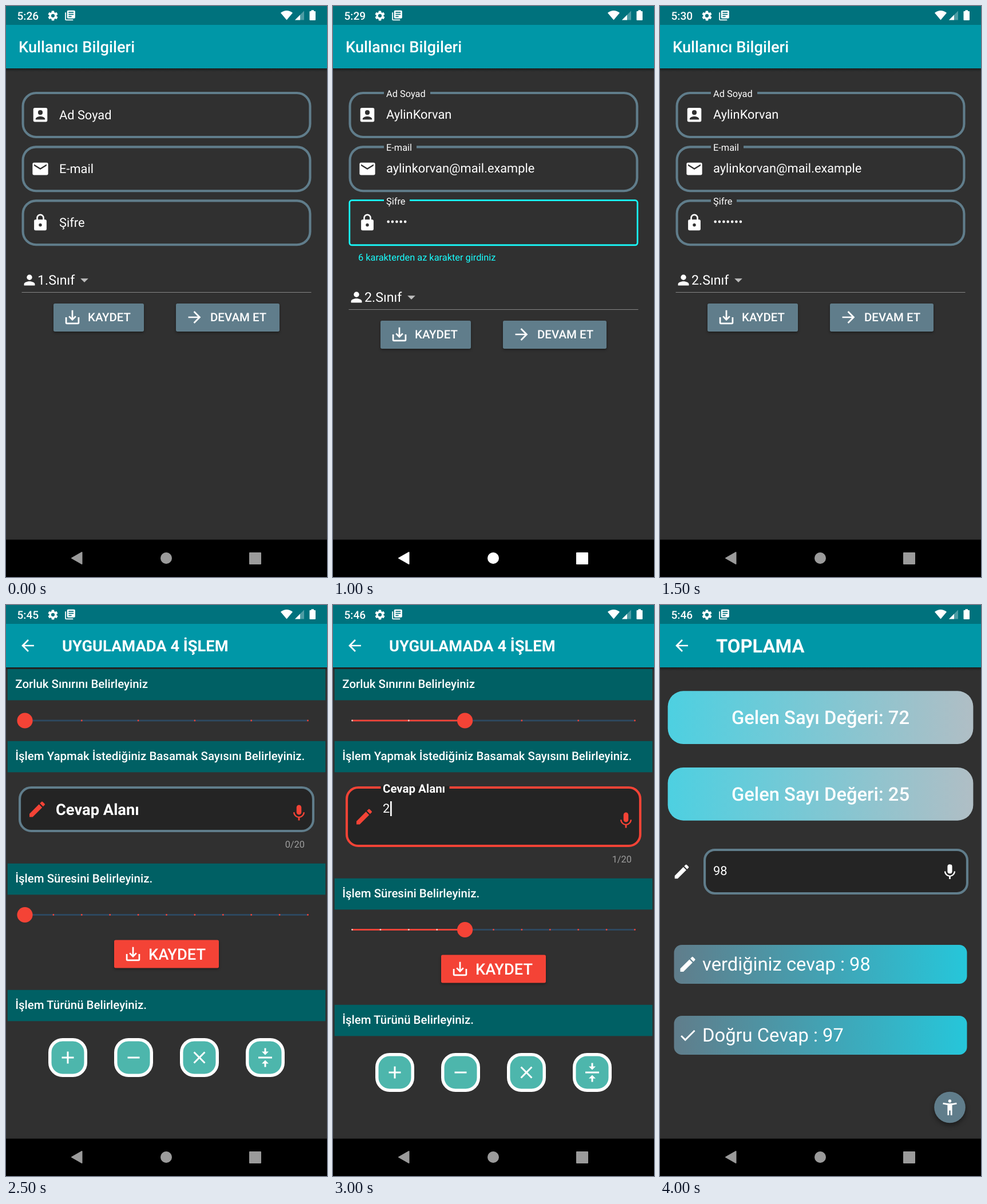
An HTML page for the animation above (4500 ms loop, 561x998 px).

```html
<!DOCTYPE html>
<html lang="tr">
<head>
<meta charset="utf-8">
<title>Dört işlem</title>
<style>
  html, body { margin: 0; width: 100%; height: 100%; overflow: hidden; background: #303030; }
  svg { display: block; width: 561px; height: 998px; font-family: Roboto, sans-serif; text-rendering: geometricPrecision; }
  .shadow { filter: drop-shadow(0 2px 2px rgba(0, 0, 0, .4)); }
</style>
</head>
<body>
<svg id="stage" viewBox="0 0 561 998"></svg>
<script>
const SLATE = '#607d8b', RED = '#f44336', FOCUS = '#18ffff', BACK = '#303030', FILL = '#242424';
const DP = 561 / 411.43;

// Icon outlines on a 24 unit grid
const ICONS = {
  account: 'M3 5v14a2 2 0 0 0 2 2h14a2 2 0 0 0 2-2V5a2 2 0 0 0-2-2H5a2 2 0 0 0-2 2zm12 4a3 3 0 1 1-6 0 3 3 0 0 1 6 0zm-9 8c0-2 4-3.1 6-3.1s6 1.1 6 3.1v1H6v-1z',
  mail: 'M20 4H4a2 2 0 0 0-2 2v12a2 2 0 0 0 2 2h16a2 2 0 0 0 2-2V6a2 2 0 0 0-2-2zm0 4-8 5-8-5V6l8 5 8-5v2z',
  lock: 'M18 8h-1V6A5 5 0 0 0 7 6v2H6a2 2 0 0 0-2 2v10a2 2 0 0 0 2 2h12a2 2 0 0 0 2-2V10a2 2 0 0 0-2-2zm-6 9a2 2 0 1 1 0-4 2 2 0 0 1 0 4zm3.1-9H8.9V6a3.1 3.1 0 0 1 6.2 0v2z',
  person: 'M12 12a4 4 0 1 0 0-8 4 4 0 0 0 0 8zm0 2c-2.67 0-8 1.34-8 4v2h16v-2c0-2.66-5.33-4-8-4z',
  people: 'M16 11a3 3 0 1 0 0-6 3 3 0 0 0 0 6zm-8 0a3 3 0 1 0 0-6 3 3 0 0 0 0 6zm0 2c-2.33 0-7 1.17-7 3.5V19h14v-2.5c0-2.33-4.67-3.5-7-3.5zm8 0-1 .05c1.2.84 2 1.97 2 3.45V19h6v-2.5c0-2.33-4.67-3.5-7-3.5z',
  drop: 'M7 10l5 5 5-5z',
  save: 'M19 12v7H5v-7H3v7a2 2 0 0 0 2 2h14a2 2 0 0 0 2-2v-7h-2zm-6 .67 2.59-2.58L17 11.5l-5 5-5-5 1.41-1.41L11 12.67V3h2z',
  next: 'M12 4l-1.41 1.41L16.17 11H4v2h12.17l-5.58 5.59L12 20l8-8z',
  back: 'M20 11H7.83l5.59-5.59L12 4l-8 8 8 8 1.41-1.41L7.83 13H20z',
  pencil: 'M3 17.25V21h3.75L17.81 9.94l-3.75-3.75zM20.71 7.04a1 1 0 0 0 0-1.41l-2.34-2.34a1 1 0 0 0-1.41 0l-1.83 1.83 3.75 3.75z',
  mic: 'M12 14a3 3 0 0 0 3-3V5a3 3 0 0 0-6 0v6a3 3 0 0 0 3 3zm5.3-3a5.3 5.3 0 0 1-10.6 0H5c0 3.41 2.72 6.23 6 6.72V21h2v-3.28c3.28-.48 6-3.3 6-6.72z',
  check: 'M9 16.2 4.8 12l-1.4 1.4L9 19 21 7l-1.4-1.4z',
  plus: 'M19 13h-6v6h-2v-6H5v-2h6V5h2v6h6z',
  minus: 'M19 13H5v-2h14z',
  times: 'M19 6.41 17.59 5 12 10.59 6.41 5 5 6.41 10.59 12 5 17.59 6.41 19 12 13.41 17.59 19 19 17.59 13.41 12z',
  divide: 'M8 19h3v4h2v-4h3l-4-4zm8-14h-3V1h-2v4H8l4 4zM4 11v2h16v-2z',
  figure: 'M20.5 6c-2.61.7-5.67 1-8.5 1s-5.89-.3-8.5-1L3 8c1.86.5 4 .83 6 1v13h2v-6h2v6h2V9c2-.17 4.14-.5 6-1zM12 6a2 2 0 1 0 0-4 2 2 0 0 0 0 4z',
  gear: 'M19.4 13a7.5 7.5 0 0 0 0-2l2.1-1.6c.2-.2.3-.4.1-.7l-2-3.4c-.1-.2-.4-.3-.6-.2l-2.5 1a7 7 0 0 0-1.7-1l-.4-2.6c0-.3-.2-.5-.5-.5h-4c-.2 0-.4.2-.5.4l-.3 2.7a7 7 0 0 0-1.7 1l-2.5-1c-.2-.1-.5 0-.6.2l-2 3.4c-.1.2 0 .5.1.6L4.6 11a7.5 7.5 0 0 0 0 2l-2.1 1.6c-.2.2-.3.4-.1.7l2 3.4c.1.2.4.3.6.2l2.5-1a7 7 0 0 0 1.7 1l.3 2.7c0 .2.3.4.5.4h4c.3 0 .5-.2.5-.4l.4-2.7a7 7 0 0 0 1.7-1l2.5 1c.2.1.5 0 .6-.2l2-3.4c.1-.2.1-.5-.1-.6zM12 15.6a3.6 3.6 0 1 1 0-7.2 3.6 3.6 0 0 1 0 7.2z',
  books: 'M4 6H2v14a2 2 0 0 0 2 2h14v-2H4zm16-4H8a2 2 0 0 0-2 2v12a2 2 0 0 0 2 2h12a2 2 0 0 0 2-2V4a2 2 0 0 0-2-2zm-1 9H9V9h10zm-4 4H9v-2h6zm4-8H9V5h10z'
};

const icon = (name, cx, cy, scale = DP, color = '#fff') =>
  `<path d="${ICONS[name]}" fill="${color}" fill-rule="evenodd" transform="translate(${cx} ${cy}) scale(${scale}) translate(-12 -12)"/>`;
const text = (value, x, y, dp, weight = 400, color = '#fff', anchor = 'start') =>
  `<text x="${x}" y="${y}" font-size="${dp * DP}" font-weight="${weight}" fill="${color}" text-anchor="${anchor}">${value}</text>`;
const box = (x, y, w, h, fill, r = 0, extra = '') =>
  `<rect x="${x}" y="${y}" width="${w}" height="${h}" rx="${r}" fill="${fill}" ${extra}/>`;
const outline = (x, y, w, h, color, line, r, fill = 'none') =>
  box(x + line / 2, y + line / 2, w - line, h - line, fill, r - line / 2, `stroke="${color}" stroke-width="${line}"`);
const group = (dy, content) => `<g transform="translate(0 ${dy})">${content}</g>`;
const button = (x, y, w, color, content) => box(x, y, w, 49, color, 2.7, 'class="shadow"') + content;

const gradient = (id, from, to) =>
  `<linearGradient id="${id}"><stop stop-color="${from}"/><stop offset="1" stop-color="${to}"/></linearGradient>`;
const defs = `<defs>${gradient('pill', '#4dd0e1', '#b0bec5')}${gradient('answer', SLATE, '#26c6da')}
  <linearGradient id="barShadow" x2="0" y2="1"><stop stop-opacity=".4"/><stop offset="1" stop-opacity="0"/></linearGradient></defs>`;

function statusBar(clock) {
  return box(0, 0, 561, 33, '#00727d') + text(clock, 19.5, 24, 14, 500)
    + icon('gear', 82, 17, .86) + icon('books', 112, 16.5, .88)
    + `<path d="M490.5 24.5 480 12Q490.5 4 501 12Z" fill="#fff"/>
       <path d="M505 24.5h16v-16z" fill="#fff" fill-opacity=".3"/><path d="M505 24.5h9v-9z" fill="#fff"/>
       <path d="M533.5 9v-1.8h4.5V9h2q1 0 1 1v14q0 1-1 1h-8.5q-1 0-1-1V10q0-1 1-1z" fill="#fff"/>`;
}

function appBar(title, { back = true, dp = 20, weight = 700 } = {}) {
  return box(0, 109, 561, 6, 'url(#barShadow)') + box(0, 32.7, 561, 76.3, '#0097a7')
    + (back ? icon('back', 38, 71) : '')
    + text(title, back ? 98 : 22, 71 + dp * .485, dp, weight);
}

function navBar(bright) {
  const color = bright ? '#fff' : '#9b9b9b';
  return box(0, 932.7, 561, 66, '#000')
    + `<g fill="${color}" stroke="${color}" stroke-width="2" stroke-linejoin="round">
       <path d="M115 965 132.5 955v20z"/><circle cx="280" cy="965" r="9"/><path d="M426 956h19v19h-19z"/></g>`;
}

function field(y, name, label, labelWidth, value, focused) {
  const frame = focused ? outline(27.5, y, 506, 81, FOCUS, 2.7, 5.5) : outline(27.5, y, 506, 81, SLATE, 4.1, 25);
  const content = value
    ? box(89, y - 1, labelWidth + 12, 7, BACK) + text(label, 93, y + 9, 12) + text(value, 93, y + 46.5, 16)
    : text(label, 93, y + 47.5, 16);
  return frame + icon(name, 60, y + 40.3) + content;
}

const gradeRow = (grade, y) => icon('person', 41, y, 1.18) + text(`${grade}.Sınıf`, 55, y + 8, 17);

function form({ name, mail, password, warning, grade = 1, menu }) {
  const lower = gradeRow(grade, 479) + icon('drop', 137, 479, DP, '#bdbdbd')
    + box(27.5, 500, 506, 1, '#858585')
    + button(83, 520, 158, SLATE, icon('save', 116, 544) + text('KAYDET', 143, 551.3, 15, 500))
    + button(297, 520, 181, SLATE, icon('next', 329.5, 544) + text('DEVAM ET', 357, 551.3, 15, 500));
  const list = box(28, 437, 505, 348, BACK, 2.7, 'class="shadow"')
    + [1, 2, 3, 4, 5].map((n, i) => gradeRow(n, 479 + i * 48 * DP)).join('');
  return appBar('Kullanıcı Bilgileri', { back: false, weight: 500 })
    + field(150, 'account', 'Ad Soyad', 69, name)
    + field(244.3, 'mail', 'E-mail', 45, mail)
    + field(338.3, 'lock', 'Şifre', 33, password, warning)
    + (warning ? text('6 karakterden az karakter girdiniz', 44, 445, 12, 400, FOCUS) : '')
    + group(warning ? 30 : 0, lower) + (menu ? list : '');
}

function menuScreen() {
  const card = x => box(x, 116, 275, 136.5, '#546e7a', 2.7, 'class="shadow"');
  return appBar('MENÜ')
    + card(3) + text('Bireysel', 55, 194, 20, 700) + icon('person', 205.5, 184.5, 1.7)
    + card(283) + text('Yarışma', 335, 194, 20, 700) + icon('people', 486, 184.5, 1.7);
}

const heading = (label, y) => box(2.7, y, 555.6, 54.5, '#006064') + text(label, 16.3, y + 33, 15, 500);

function slider(y, steps, value) {
  const left = 33.5, step = 494 / steps, thumb = left + step * value;
  let ticks = '';
  for (let i = 0; i <= steps; i++)
    ticks += `<circle cx="${left + step * i}" cy="${y}" r="1.4" fill="${i < value ? '#f9c9c3' : RED}"/>`;
  return box(left, y - 1.4, 494, 2.8, '#2d4a62') + box(left, y - 1.4, thumb - left, 2.8, RED) + ticks
    + `<circle cx="${thumb - .5}" cy="${y}" r="13.6" fill="${RED}"/>`;
}

function settings({ difficulty = 0, duration = 0, digits = '' }) {
  const grow = digits ? 26 : 0, middle = 357 + grow / 2;
  const input = outline(22, 317, 517, 80 + grow, digits ? RED : SLATE, 4.1, 22, FILL)
    + icon('pencil', 54.5, middle, 1.5, RED) + icon('mic', 512, middle + 6.7, 1.42, RED)
    + (digits
      ? box(83.5, 316.5, 120, 6, FILL) + text('Cevap Alanı', 87, 328, 15, 700)
        + text(digits, 87, 363, 16) + box(100, 343, 2.7, 26, '#fff')
      : text('Cevap Alanı', 87, 367, 20, 700));
  const operations = ['plus', 'minus', 'times', 'divide'].map((name, i) => {
    const x = 108 + 115 * i;
    return outline(x - 34, 757, 68, 68, '#fff', 5.5, 25, '#4db6ac') + icon(name, x, 791, 1.5);
  }).join('');
  return appBar('UYGULAMADA 4 İŞLEM')
    + heading('Zorluk Sınırını Belirleyiniz', 112) + slider(202, 5, difficulty)
    + heading('İşlem Yapmak İstediğiniz Basamak Sayısını Belirleyiniz.', 237.8) + input
    + group(grow, text(`${digits.length}/20`, 522, 423.5, 12, 400, '#9e9e9e', 'end')
      + heading('İşlem Süresini Belirleyiniz.', 451.8) + slider(541.5, 10, duration)
      + button(189, 585.5, 183, RED, icon('save', 222, 610) + text('KAYDET', 249, 620, 20, 500))
      + heading('İşlem Türünü Belirleyiniz.', 672.8) + operations);
}

function addition(first, second, answer) {
  const pill = (value, y) => box(13.6, y, 533.8, 92.7, 'url(#pill)', 27.3)
    + text(`Gelen Sayı Değeri: ${value}`, 280.5, y + 57.5, 24, 500, '#fff', 'middle');
  const result = (name, label, y) => box(24.5, y, 512, 68, 'url(#answer)', 13.6)
    + icon(name, 48.5, y + 34, 1.45) + text(label, 74, y + 45.3, 24);
  return appBar('TOPLAMA', { dp: 24 })
    + pill(first, 150.3) + pill(second, 284)
    + icon('pencil', 38, 466) + outline(76, 426, 463, 80, SLATE, 4.1, 20, FILL)
    + text(answer, 93, 472, 16) + icon('mic', 506.5, 466.8)
    + result('pencil', `verdiğiniz cevap : ${answer}`, 594)
    + result('check', `Doğru Cevap : ${first + second}`, 718)
    + `<circle cx="506.5" cy="878" r="27.3" fill="${SLATE}" style="filter:drop-shadow(0 4px 4px rgba(0,0,0,.45))"/>`
    + icon('figure', 506.5, 878);
}

const user = { name: 'AylinKorvan', mail: 'aylinkorvan@mail.example', password: '•••••' };
const HOLD = 500;
const scenes = [
  ['5:26', form({})],
  ['5:29', form({ ...user, menu: true })],
  ['5:29', form({ ...user, warning: true, grade: 2 }), true],
  ['5:30', form({ ...user, password: '•••••••', grade: 2 })],
  ['5:45', menuScreen(), true],
  ['5:45', settings({})],
  ['5:46', settings({ difficulty: 2, duration: 4, digits: '2' })],
  ['5:46', addition(53, 38, 91)],
  ['5:46', addition(72, 25, 98)]
];

const stage = document.getElementById('stage');
stage.innerHTML = defs + scenes.map(([clock, content, bright]) =>
  `<g class="scene">${box(0, 0, 561, 998, BACK)}${content}${statusBar(clock)}${navBar(bright)}</g>`).join('');
const layers = [...stage.querySelectorAll('.scene')];

const start = performance.now();
function draw(now) {
  const current = Math.floor(Math.max(0, now - start) / HOLD) % scenes.length;
  layers.forEach((layer, i) => layer.style.display = i === current ? '' : 'none');
  requestAnimationFrame(draw);
}
draw(start);
</script>
</body>
</html>
```
